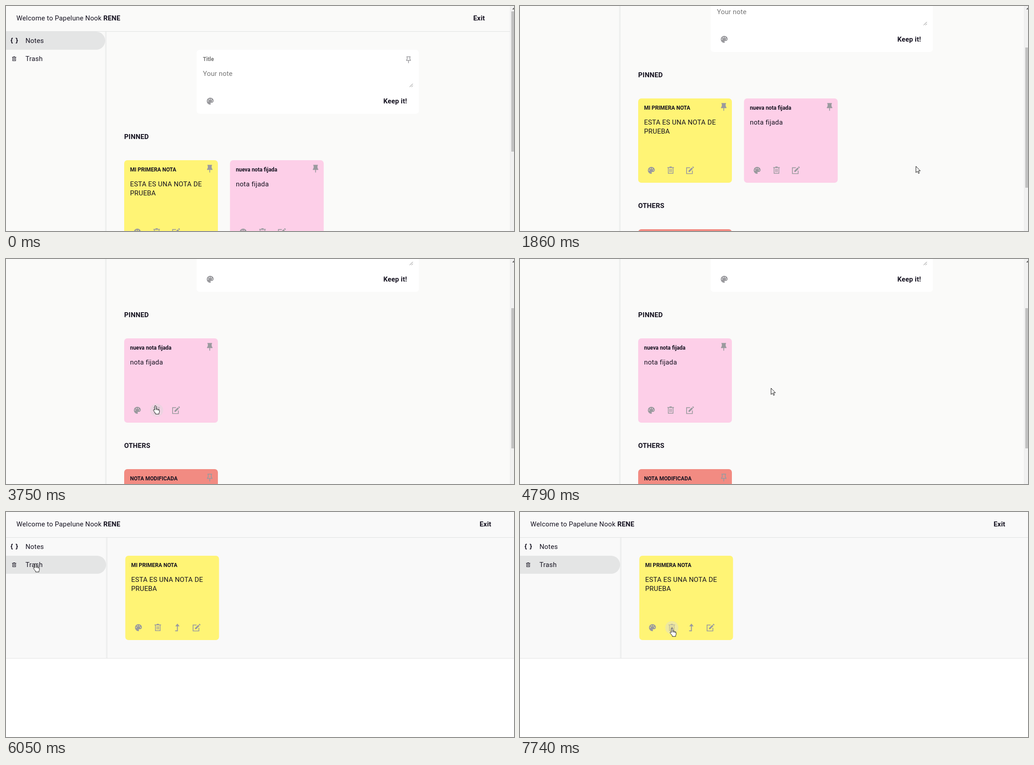
An HTML page that plays this animation: 1122 px wide and 499 px high, repeating every 8 s.

```html
<!DOCTYPE html>
<html lang="en">
<head>
<meta charset="utf-8">
<title>Notes</title>
<style>
html, body { margin: 0; width: 100%; height: 100%; overflow: hidden; background: #fff; }
svg { display: block; width: 100vw; height: 100vh; }
text { font: 400 14.9px Roboto, sans-serif; letter-spacing: .22px; fill: #14111f; }
.b { font-weight: 700; }
.s { font-size: 11.9px; font-weight: 700; letter-spacing: 0; }
.hint { fill: #757575; }
.icon { fill: #9a9a9e; }
.line { fill: none; stroke: #9a9a9e; stroke-width: 2; }
.dark { fill: #14111f; }
.ring { fill: #d8d8d8; fill-opacity: .42; visibility: hidden; }
.hot .ring { visibility: visible; }
.hot .mark { opacity: .55; }
.cur { fill: #fff; stroke: #111; stroke-width: 1; stroke-linejoin: round; }
</style>
</head>
<body>
<svg id="stage" viewBox="0 0 1122 499" preserveAspectRatio="none"></svg>
<script>
const LOOP = 8000;
const DELETE = 3720, OPEN = 5870, LOADED = 6050;

const PIN = 'M18 3v2h-1v6l2 3v2h-6v7h-2v-7H5v-2l2-3V5H6V3z';
const PIN_LINE = PIN + 'M9 5v6.6L7.4 14h9.2L15 11.6V5z';
const BIN = 'M9 2h6v2h6v2h-1.5v16h-15V6H3V4h6zM6.5 6v14h11V6zM9 8.5h2v9H9zM13 8.5h2v9h-2z';
const dot = (x, y) => `M${x - 1.35} ${y}a1.35 1.35 0 1 0 2.7 0a1.35 1.35 0 1 0-2.7 0z`;
const PALETTE = 'M12 3a9 9 0 0 0 0 18c.83 0 1.5-.67 1.5-1.5 0-.39-.15-.74-.39-1.01-.23-.26-.38-.61-.38-.99 ' +
  '0-.83.67-1.5 1.5-1.5H16c2.76 0 5-2.24 5-5 0-4.42-4.03-8-9-8z' +
  dot(6.5, 11.5) + dot(9.5, 7.5) + dot(14.5, 7.5) + dot(17.5, 11.5);

const text = (x, y, s, cls = '') => `<text x="${x}" y="${y}" class="${cls}">${s}</text>`;
const rect = (x, y, w, h, fill, r = 0) =>
  `<rect x="${x}" y="${y}" width="${w}" height="${h}" rx="${r}" fill="${fill}"/>`;
const group = (id, body, at = '0 0') => `<g id="${id}" transform="translate(${at})">${body}</g>`;
const glyph = (d, x, y, k, cls = 'icon') =>
  `<path class="${cls}" fill-rule="evenodd" d="${d}" transform="translate(${x} ${y}) scale(${k}) translate(-12 -12)"/>`;

const marks = {
  palette: glyph(PALETTE, 0, 0, .85),
  bin: glyph(BIN, 0, -.5, .8),
  up: '<path class="line" d="M-4.5 7H.5V-4"/><path class="icon" d="M-4.3-3L.5-9l4.8 6z"/>',
  edit: `<g transform="scale(.85) translate(-13 -11.5)">
    <path class="line" d="M13 4.5H4V20h15v-8"/>
    <path class="icon" d="M9 12.5L17.5 4l3 3L12 15.5H9zM18.5 3l1-1q1.2-1 2.3 0l.7.7q1 1.1 0 2.3l-1 1z"/></g>`
};

const buttons = [];
function button(page, name, x, y) {
  const id = 'btn' + buttons.length;
  buttons.push({ id, page, x, y });
  return `<g id="${id}" transform="translate(${x} ${y})"><circle class="ring" r="14.5"/>` +
    `<g class="mark">${marks[name]}</g></g>`;
}

// A note at its top left corner; the buttons stand in page coordinates.
function note(x, y, fill, title, lines, pin) {
  return rect(x, y, 207, 187, fill, 7) + text(x + 13, y + 25, title, 's') +
    lines.map((s, i) => text(x + 13, y + 58 + i * 20, s)).join('') +
    (pin ? glyph(pin, x + 189, y + 18, .85) : '');
}
const tools = (page, names, x, y) =>
  names.map((n, i) => button(page, n, x + 29 + i * 42.8, y + 159.5)).join('');

function frame(side, exitX, row) {
  const y = 57 + row * 40;
  const brace = 'M15 71.5h-.8q-1.7 0-1.7 1.6v2q0 1.7-2 1.7 2 0 2 1.7v2q0 1.6 1.7 1.6h.8';
  return rect(0, 56, 1122, 1, '#dfe1e1') +
    `<path fill="#e4e5e5" d="M0 ${y}H${side - 20}a20 20 0 0 1 0 40H0z"/>` +
    text(23, 32, 'Welcome to Papelune Nook <tspan class="b">RENE</tspan>') +
    text(exitX, 32, 'Exit', 'b') +
    `<g fill="none" stroke="#14111f" stroke-width="1.8"><path d="${brace}"/>` +
    `<path d="${brace}" transform="translate(36.6 0) scale(-1 1)"/></g>` +
    text(43, 82, 'Notes') + glyph(BIN, 18, 117, .5, 'dark') + text(43, 122, 'Trash');
}
const divider = (x, y, h) => rect(x, y, 1, h, '#e6e7e7') + rect(x + 2, y, 1, h, '#e6e7e7');

const yellow = '#fff475', pink = '#fdcfe8', red = '#f28b82', paper = '#fafaf9';
const prueba = ['ESTA ES UNA NOTA DE', 'PRUEBA'];
const trio = ['palette', 'bin', 'edit'];

const home = rect(0, 0, 1114, 900, paper) + divider(219, 57, 843) + frame(219, 1032, 0) +
  rect(421, 97, 491, 142, '#fff', 7) + text(435, 122, 'Title', 's hint') + text(435, 155, 'Your note', 'hint') +
  glyph(PIN_LINE, 889, 118.5, .75) + glyph(PALETTE, 451, 211, .85) + text(833.5, 216, 'Keep it!', 'b') +
  '<path d="M891.5 179.5l7-7m-3 7l3-3" stroke="#777" fill="none"/>' +
  text(261, 295, 'PINNED', 'b') + text(261, 585, 'OTHERS', 'b') +
  group('pinkNote', note(0, 0, pink, 'nueva nota fijada', ['nota fijada'], PIN)) +
  group('firstNote', note(261, 342, yellow, 'MI PRIMERA NOTA', prueba, PIN)) +
  tools('home', trio, 261, 342) +
  group('secondTools', tools('home', trio, 494.7, 342)) +
  note(261, 632, red, 'NOTA MODIFICADA', [], PIN_LINE);

const bar = rect(1113, 0, 1, 499, '#ececec') + rect(1114, 0, 8, 499, '#f1f1f1') +
  '<path fill="#555" d="M1118 7.5l4.5-4.5 4.5 4.5z"/>' +
  group('thumb', rect(1116, 0, 6, 311, '#c1c1c1'));

const trash = rect(0, 0, 1122, 499, '#fff') + '<rect id="sheet" width="1122" height="324" fill="#f9f9f9"/>' +
  '<rect id="edge" width="1122" height="1" fill="#e2e2e2"/>' +
  `<svg id="sideClip" width="1122" height="324">${divider(221, 57, 300)}</svg>` +
  frame(221, 1046, 1) +
  group('binned', note(263.5, 97, yellow, 'MI PRIMERA NOTA', prueba) +
    tools('trash', ['palette', 'bin', 'up', 'edit'], 263.5, 97));

const arrow = '<path class="cur" d="M.5.5v14l3.2-3 2.4 5 2-1-2.3-4.8h4.4z"/>';
const hand = '<g transform="translate(0 -.5)">' +
  '<path class="cur" d="M-1.7 1.5q0-1.8 1.5-1.8t1.6 1.8v4.8q2.2-.6 2.6.9 2.1-.5 2.5 1 2.3-.3 2.3 2v3.2' +
  'q0 1.5-1 2.8v2.3h-7.5v-1.8l-4-5q-1.6-2.2-.3-2.9t2.3 1z"/>' +
  '<path class="cur" d="M1.4 6v3.5M4 7.2v2.8M6.5 8.2v2.3"/></g>';

document.getElementById('stage').innerHTML =
  group('home', home) + group('bar', bar) + group('trash', trash) +
  group('arrow', arrow) + group('hand', hand);

const $ = id => document.getElementById(id);
const show = (id, on) => { $(id).style.display = on ? '' : 'none'; };
const move = (id, x, y) => $(id).setAttribute('transform', `translate(${x} ${y})`);

// time, x, y of the pointer
const path = [
  [20, 1104, 482], [210, 907, 344], [1320, 907, 344], [1380, 874, 355],
  [1970, 874, 355], [2540, 376, 330], [2610, 376, 330], [2740, 369, 327], [2770, 369, 327],
  [3120, 328, 326], [3470, 328, 326], [3490, 330, 326], [4380, 330, 326],
  [4790, 554, 286], [5230, 554, 286], [5740, 65, 115], [6390, 65, 115],
  [6530, 95, 107], [6980, 382, 205], [7200, 350, 228], [7230, 352, 215],
  [7350, 318, 232], [7510, 335, 256], [7660, 335, 256], [7740, 336, 258], [LOOP, 336, 258]
];
// time, scroll offset
const scrolls = [[550, 0], [740, 83], [1740, 83], [1940, 166], [4930, 166], [5230, 0]];

// Slope of a key: flat at the ends and beside a rest.
function slope(keys, i, c) {
  const a = keys[i - 1], b = keys[i], d = keys[i + 1];
  if (!a || !d) return 0;
  const rest = (p, q) => p.every((v, n) => !n || v === q[n]);
  return rest(a, b) || rest(b, d) ? 0 : (d[c] - a[c]) / (d[0] - a[0]);
}

function sample(keys, t, c) {
  if (t <= keys[0][0]) return keys[0][c];
  const i = keys.findIndex(k => k[0] > t) - 1;
  if (i < 0) return keys[keys.length - 1][c];
  const a = keys[i], b = keys[i + 1], w = b[0] - a[0], u = (t - a[0]) / w;
  const s = u * u * (3 - 2 * u);
  return a[c] + (b[c] - a[c]) * s +
    w * u * (1 - u) * ((1 - u) * slope(keys, i, c) - u * slope(keys, i + 1, c));
}

function draw(t) {
  const page = t < OPEN ? 'home' : 'trash';
  const loaded = t >= LOADED, deleted = t >= DELETE;
  const scroll = page === 'home' ? sample(scrolls, t, 1) : 0;
  const x = sample(path, t, 1), y = sample(path, t, 2);

  show('home', page === 'home');
  show('bar', page === 'home');
  show('trash', page === 'trash');
  move('home', 0, -Math.round(scroll));
  move('thumb', 0, Math.round(12 + scroll * .583));
  move('pinkNote', deleted ? 261 : 494.7, 342);
  show('firstNote', !deleted);
  show('secondTools', !deleted);

  const bottom = loaded ? 324 : 137;
  $('sheet').setAttribute('height', bottom);
  $('sideClip').setAttribute('height', bottom);
  $('edge').setAttribute('y', bottom);
  show('binned', loaded);

  let over = x < 219 && y + scroll > 57 && y + scroll < 137;
  for (const b of buttons) {
    const gone = b.page !== page || (page === 'trash' ? !loaded : deleted && b.x > 480);
    const hot = !gone && t >= 20 && Math.hypot(x - b.x, y + scroll - b.y) <= 14;
    $(b.id).classList.toggle('hot', hot);
    over = over || hot;
  }
  show('arrow', t >= 20 && !over);
  show('hand', t >= 20 && over);
  move('arrow', Math.round(x), Math.round(y));
  move('hand', Math.round(x), Math.round(y));
}

const start = performance.now();
function tick() {
  draw((performance.now() - start) % LOOP);
  requestAnimationFrame(tick);
}
tick();
</script>
</body>
</html>
```
